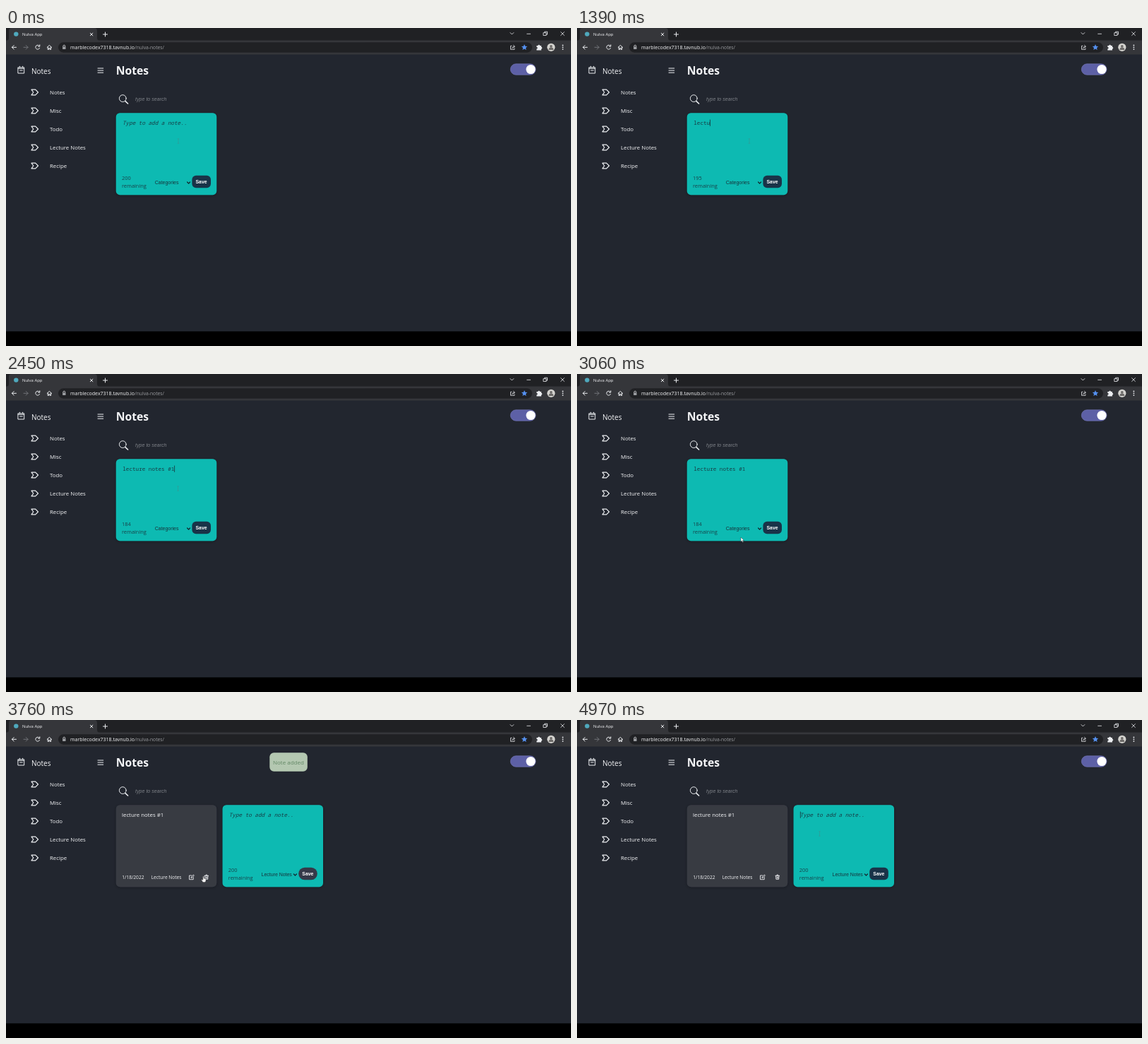
Animation of 800x450 px, one loop 5000 ms. Source, as an HTML page:

```html
<!DOCTYPE html>
<html lang="en">
<head>
<meta charset="utf-8">
<title>Notes</title>
<style>
  html, body { margin: 0; width: 100%; height: 100%; overflow: hidden; background: #000; }
  svg { display: block; width: 100%; height: 100%; }
  text { font: 7.85px "Open Sans", "Noto Sans", sans-serif; fill: #f4f5f7; white-space: pre; }
  .line { fill: none; stroke: #eceef1; stroke-width: 1; stroke-linecap: round; stroke-linejoin: round; }
  .small { font-size: 6.6px; }
  .url { font-size: 7px; }
  .arial { font: 6.95px "Liberation Sans", Arial, sans-serif; fill: #17343b; }
  .mono { font: 7.62px "Noto Sans Mono", "DejaVu Sans Mono", monospace; fill: #183d45; }
  .count { font-size: 7.4px; font-weight: 500; fill: #194249; }
</style>
</head>
<body>
<svg viewBox="0 0 800 450">
  <defs>
    <filter id="shadow" x="-10%" y="-10%" width="120%" height="125%">
      <feDropShadow dx="0" dy="1" stdDeviation="2" flood-opacity=".3"/>
    </filter>
  </defs>

  <!-- browser frame -->
  <rect width="800" height="450" fill="#22262f"/>
  <rect width="800" height="18" fill="#202124"/>
  <rect y="17.5" width="800" height="20" fill="#35363a"/>
  <path d="M0 18Q4 18 4 14V4Q4 0 8 0H125Q129 0 129 4V14Q129 18 133 18Z" fill="#35363a"/>
  <circle cx="14.3" cy="8.6" r="3.2" fill="#4fa9bd"/>
  <text x="23" y="10.9" style="font-size:5.95px">Nulva App</text>
  <rect x="74" y="20.3" width="671" height="14.4" rx="7.2" fill="#202124"/>
  <g class="line">
    <path d="M119.3 7.2l3.6 3.6m0-3.6l-3.6 3.6M137.5 9h6m-3-3v6"/>
    <path d="M14.5 27.3H8.4m2.8-2.8l-2.8 2.8 2.8 2.8"/>
    <path d="M25 27.3h6.1m-2.8-2.8l2.8 2.8-2.8 2.8" stroke="#707277" style="stroke:#707277"/>
    <path d="M47.4 25.5a3 3 0 1 0 .2 3M47.8 23.8v2.3h-2.3"/>
    <path d="M58.2 27.4l3.2-3 3.2 3m-5.4-.6v3.6h1.5v-2h1.4v2h1.5v-3.6"/>
    <path d="M714 6.6l2.4 2.4 2.4-2.4M737.7 8.3h4.8M785.6 5.7l4.8 4.8m0-4.8l-4.8 4.8" stroke-width=".8"/>
    <path d="M761.2 6.7h3.8v3.8h-3.8zM762.6 6.5V5.2h3.9v3.9h-1.3" stroke-width=".8"/>
    <path d="M716 25.3h-1.5v5h5.5v-1.3m-3.5-.4q.5-2.4 3.2-2.4m-1.2-1.8l2 1.8-2 1.8" stroke-width=".8"/>
    <path d="M80.9 26.6v-1a1.4 1.4 0 0 1 2.8 0v1" stroke-width=".8"/>
  </g>
  <rect x="80.1" y="26.4" width="4.4" height="3.5" rx=".5" fill="#9b9da1"/>
  <text class="url" x="91" y="29.9">marblecodex7318.tavnub.io</text>
  <text class="url" x="182.2" y="29.9" style="font-size:6.75px;fill:#999b9f">/nulva-notes/</text>
  <path d="M734 23l1.2 2.8 3 .3-2.2 2 .6 3-2.6-1.6-2.6 1.6.6-3-2.2-2 3-.3z" fill="#5590ef"/>
  <path d="M751.3 25h2a1.3 1.3 0 0 1 2.6 0h2v2a1.3 1.3 0 0 1 0 2.6v1.8h-6.6v-1.8a1.3 1.3 0 0 0 0-2.6z" fill="#eceef1"/>
  <circle cx="771.8" cy="27.3" r="5.6" fill="#d4d3cf"/>
  <path d="M768.4 31q0-3.4 3.4-3.4t3.4 3.4z" fill="#6c6a68"/>
  <circle cx="771.8" cy="25.9" r="1.8" fill="#6c6a68"/>
  <g fill="#eceef1"><circle cx="788.4" cy="24.5" r=".9"/><circle cx="788.4" cy="27.3" r=".9"/><circle cx="788.4" cy="30.1" r=".9"/></g>

  <!-- page -->
  <g class="line" stroke-width="1.3">
    <path d="M17.3 55.8h8.4v8.2h-8.4zM17.3 57.3h8.4M19.4 54.2v1.6m4.2-1.6v1.6M19.6 60h3.8"/>
    <path d="M130 57h7.7M130 60.1h7.7M130 63.2h7.7"/>
    <path d="M169 103.6l3.6 3.4" stroke-width="1.6"/>
    <circle cx="165.3" cy="99.6" r="4.9"/>
  </g>
  <text x="36" y="64.7" style="font-size:10px">Notes</text>
  <g id="menu"></g>
  <text x="155.7" y="66" style="font-size:15.7px;font-weight:700">Notes</text>
  <text class="arial" x="183" y="103" style="font-size:7.1px;font-style:italic;fill:#7d8087">type to search</text>
  <rect x="714.3" y="50.8" width="35.7" height="15.4" rx="7.7" fill="#5d60a6" stroke="#7173b4" stroke-width=".7"/>
  <circle cx="743" cy="58.5" r="6.6" fill="#fff"/>

  <!-- saved note -->
  <g id="saved">
    <rect x="155.8" y="120.2" width="142.4" height="116" rx="5.5" fill="#383b43" filter="url(#shadow)"/>
    <text x="164" y="137.2">lecture notes #1</text>
    <text class="small" x="164.2" y="225.4">1/18/2022</text>
    <text class="small" x="205.7" y="225.4">Lecture Notes</text>
    <g class="line" style="stroke-width:.9">
      <path d="M262.5 220h-3v5.7h5.7v-3M262 223.3l.3-1.4 3-2.8 1.1 1.1-2.9 2.8z"/>
      <path d="M281 220.3h5.6m-3.6-.1v-1.1h1.6v1.1M281.6 220.5l.3 4.8h3.8l.3-4.8M283.1 222v2m1.4-2v2"/>
    </g>
  </g>

  <!-- note editor -->
  <g id="editor">
    <rect x="155.8" y="120.2" width="142.4" height="116" rx="5.5" fill="#10bab2" filter="url(#shadow)"/>
    <text id="hint" class="mono" x="165" y="137" style="font-style:italic">Type to add a note..</text>
    <text id="typed" class="mono" x="165.3" y="137"></text>
    <rect id="caret" y="129.6" width=".8" height="9.2" fill="#173239"/>
    <text id="count" class="count" x="164" y="215.4"></text>
    <text class="count" x="164" y="226">remaining</text>
    <text id="category" class="arial" x="210.8" y="221.3"></text>
    <path class="line" d="M256.6 218l2 2 2-2" style="stroke:#12272d;stroke-width:1.2"/>
    <rect id="save" x="263.4" y="208.8" width="26.6" height="17.4"/>
    <text class="arial" x="268.5" y="219.8" style="font-weight:700;font-size:6.9px;fill:#fff">Save</text>
  </g>

  <g id="toast">
    <rect x="373.3" y="46.3" width="53.5" height="26.4" rx="6" fill="#b4c8b1"/>
    <text x="378" y="62.8" style="font-size:8px;fill:#628765">Note added</text>
  </g>

  <!-- pointer shapes, hot spot at 0,0 -->
  <g id="pointer">
    <path id="beam" d="M-1.3-3.2h2.6M0-3.2v6.4M-1.3 3.2h2.6" fill="none" stroke="#6a6f70" stroke-width=".7" opacity=".4"/>
    <path id="arrow" d="M0 0v6.3l1.5-1.3 1 2.2 1-.4-1-2.2h2z" fill="#fff" stroke="#222" stroke-width=".4"/>
    <path id="hand" d="M-.7 .7q.7-1.3 1.4 0v2.4l2.2.6q.9.3.8 1.3l-.5 2.6q-.2.8-1 .8H-.2q-.6 0-1-.6l-1.5-2.3q-.3-1 .7-.8l1.3.8z" fill="#fff" stroke="#222" stroke-width=".4"/>
  </g>
  <rect y="429.3" width="800" height="20.7" fill="#000"/>
</svg>
<script>
const $ = id => document.getElementById(id);
const show = (id, on) => $(id).style.display = on ? '' : 'none';
const ramp = (t, a, b) => Math.min(1, Math.max(0, (t - a) / (b - a)));
const ease = k => k * k * (3 - 2 * k);
const mix = (a, b, k) => a + (b - a) * k;

const LOOP = 5000, SENT = 3690, MOVED = 3745;
const NOTE = 'lecture notes #1', ADVANCE = 4.572;
const LAST_KEYS = [1900, 2050, 2250, 2400];
const PATH = [ // time, x, y
  [0, 244, 160], [2430, 244, 160], [2630, 230, 228.5], [2720, 230, 219], [2900, 231, 219],
  [3060, 232, 231], [3170, 233, 261], [3290, 233, 261], [3540, 279.5, 221],
  [3880, 279.5, 221], [4200, 343.5, 161], [LOOP, 343.5, 161]
];

$('menu').innerHTML = ['Notes', 'Misc', 'Todo', 'Lecture Notes', 'Recipe'].map((name, i) =>
  `<g transform="translate(0 ${i * 26})"><path class="line" style="stroke-width:1.2"
    d="M36 87.2h5.7l3.8 3.8-3.8 3.8H36l2.8-3.8z"/><text x="62" y="94">${name}</text></g>`).join('');

function typedCount(t) {
  if (t < 1050 || t >= SENT) return 0;
  return Math.min(12, Math.floor((t - 1050) / 70) + 1) + LAST_KEYS.filter(k => k <= t).length;
}

function pointerAt(t) {
  const i = PATH.findIndex(p => p[0] > t);
  const [t0, x0, y0] = PATH[i - 1], [t1, x1, y1] = PATH[i];
  const k = ease(ramp(t, t0, t1));
  return [mix(x0, x1, k), mix(y0, y1, k)];
}

function draw(t) {
  const n = typedCount(t), moved = t >= MOVED, shift = moved ? 150.8 : 0;
  show('saved', moved);
  $('editor').setAttribute('transform', `translate(${shift} 0)`);
  show('hint', n === 0);
  $('typed').textContent = NOTE.slice(0, n);
  $('count').textContent = 200 - n;
  $('category').textContent = t < 3280 ? 'Categories' : 'Lecture Notes';
  show('caret', (t >= 130 && t < 640) || (t >= 1050 && t < 2900 && n > 0) || t >= 4600);
  $('caret').setAttribute('x', 165.1 + n * ADVANCE);

  const hover = ramp(t, 3510, 3640) - ramp(t, 3770, 3930);
  const rgb = [[25, 51, 72], [53, 57, 73]];
  $('save').setAttribute('rx', mix(5.6, 8.7, hover));
  $('save').setAttribute('fill', `rgb(${rgb[0].map((c, i) => mix(c, rgb[1][i], hover))})`);
  show('toast', t >= SENT && t < 4700);

  const [x, y] = pointerAt(t);
  const inEditor = x > 156 + shift && x < 298 + shift;
  const beam = inEditor && y < 205;
  const hand = !beam && x > 264 && x < 290 && y > 209 && y < 227;
  $('pointer').setAttribute('transform', `translate(${x} ${y})`);
  show('beam', beam);
  show('hand', hand);
  show('arrow', !beam && !hand);
}

function tick() {
  draw(performance.now() % LOOP);
  requestAnimationFrame(tick);
}
tick();
</script>
</body>
</html>
```
